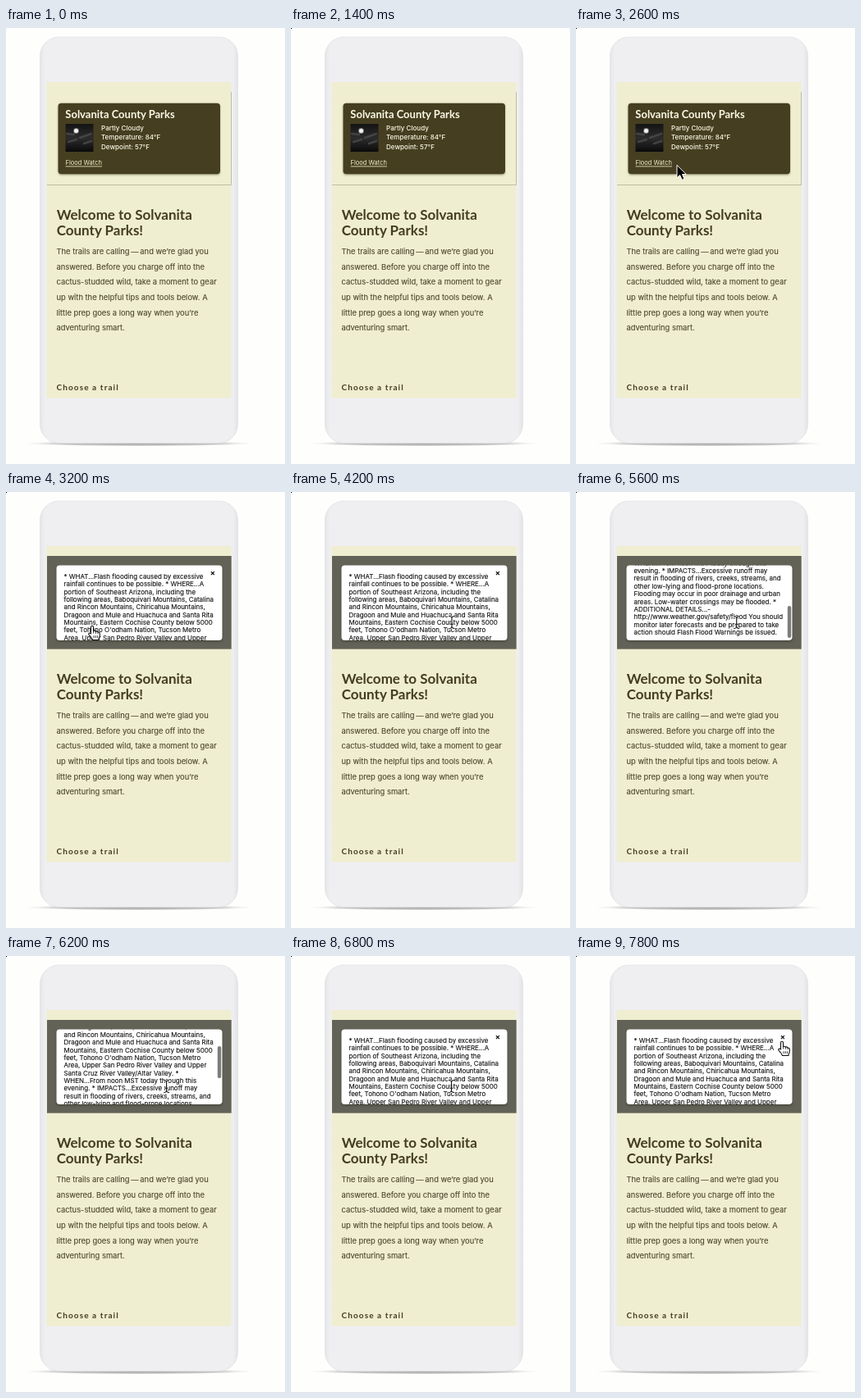
Write an HTML page that moves like this. It is 340 px wide and 532 px high and loops after 8 s.

```html
<!DOCTYPE html>
<html lang="en">
<head>
<meta charset="utf-8">
<title>Park alert on a phone</title>
<style>
html, body { margin: 0; width: 100%; height: 100%; overflow: hidden; background: #fefefc; }
svg { display: block; width: 340px; height: 532px; }
text { font-family: Inter, "Open Sans", sans-serif; white-space: pre; }
.title { font-family: Lato, "Open Sans", sans-serif; font-weight: 700; fill: #443d20; }
.body { font-size: 9.37px; fill: #4b452c; stroke: #4b452c; stroke-width: .1px; }
.card { font-size: 8.05px; font-weight: 500; fill: #fbfae8; }
.alert { font-size: 7.96px; fill: #111; stroke: #111; stroke-width: .12px; }
</style>
</head>
<body>
<svg viewBox="0 0 340 532">
  <defs>
    <linearGradient id="shell">
      <stop offset="0" stop-color="#e5e6e9"/>
      <stop offset=".025" stop-color="#efeff1"/>
      <stop offset=".975" stop-color="#efeff1"/>
      <stop offset="1" stop-color="#e3e4e8"/>
    </linearGradient>
    <radialGradient id="ground">
      <stop offset="0" stop-color="#a4a4a2"/>
      <stop offset=".7" stop-color="#b4b4b2" stop-opacity=".75"/>
      <stop offset="1" stop-color="#ddd" stop-opacity="0"/>
    </radialGradient>
    <linearGradient id="night" x2="0" y2="1">
      <stop offset="0" stop-color="#141414"/>
      <stop offset=".5" stop-color="#2c2c2c"/>
      <stop offset="1" stop-color="#080808"/>
    </linearGradient>
    <filter id="soft"><feGaussianBlur stdDeviation="1"/></filter>
    <clipPath id="photo"><rect x="72.5" y="117" width="34" height="34"/></clipPath>
    <clipPath id="box"><rect x="61.5" y="89.5" width="202" height="91.5" rx="4"/></clipPath>
  </defs>

  <rect width="340" height="532" fill="#fefefc"/>
  <ellipse cx="162" cy="507" rx="140" ry="3.4" fill="url(#ground)"/>
  <rect x="41.5" y="11" width="241" height="495.5" rx="23" fill="url(#shell)" stroke="#e0e1e4" stroke-width=".8"/>
  <rect x="49.5" y="66" width="225" height="385.5" fill="#efeed1"/>
  <path d="M50 191.5H274.5V78" fill="none" stroke="#b2b198" stroke-width=".8"/>

  <g id="forecast">
    <rect x="63.5" y="92.5" width="197.5" height="87" rx="4" fill="#6b6545" opacity=".5" filter="url(#soft)"/>
    <rect x="63.5" y="91.7" width="197.5" height="86.6" rx="4" fill="#463e20"/>
    <text class="title" x="72.3" y="109.8" style="font-size:13px;fill:#fbfae8">Solvanita County Parks</text>
    <g clip-path="url(#photo)">
      <rect x="72" y="117" width="35" height="35" fill="url(#night)"/>
      <g stroke-linecap="round" stroke-width="2.4" stroke="#4c4c4c" opacity=".8">
        <path d="M74 129L83 130M90 134L104 129M76 139L86 136M95 141L104 138"/>
      </g>
      <circle cx="85.5" cy="125.5" r="3.4" fill="#777"/>
      <circle cx="85.5" cy="125.5" r="2.5" fill="#f2f2f2"/>
    </g>
    <text class="card" x="116" y="125.4">Partly Cloudy</text>
    <text class="card" x="116" y="136.4">Temperature: 84°F</text>
    <text class="card" x="116" y="148.4">Dewpoint: 57°F</text>
    <text class="card" x="72.6" y="167.4" style="font-size:7.5px;font-weight:400;fill:#f3f1cc">Flood Watch</text>
    <path d="M72.6 168.9H117" stroke="#f3f1cc" stroke-width=".8"/>
  </g>

  <g id="modal">
    <rect x="50" y="78" width="224.5" height="113.5" fill="#626257"/>
    <rect x="61" y="91" width="203" height="92" rx="4" fill="#33332c" opacity=".4" filter="url(#soft)"/>
    <rect x="61.5" y="89.5" width="202" height="91.5" rx="4" fill="#fff"/>
    <g clip-path="url(#box)">
      <g id="alert"><path d="M249.9 97.1l4 4m0-4l-4 4" stroke="#111" stroke-width="1.3"/></g>
    </g>
    <rect id="thumb" x="257.8" y="90.5" width="4.4" height="39" rx="2.2" fill="#7d7d7d"/>
  </g>

  <text class="title" x="61.7" y="234.2" font-size="17">Welcome to Solvanita</text>
  <text class="title" x="61.7" y="253.2" font-size="17">County Parks!</text>
  <g id="intro"></g>
  <text class="title" x="61.5" y="442.3" font-size="10" letter-spacing="1.1">Choose a trail</text>

  <g id="arrow">
    <path d="M0 0V15.5L3.6 12.2L6.2 18L9 16.8L6.5 11.2H11.3Z" fill="#000" stroke="#fff" stroke-width="1"/>
  </g>
  <g id="beam" fill="none">
    <path id="stem" d="M-3.5 -7.5Q0 -7.5 0 -5Q0 -7.5 3.5 -7.5M0 -5V5M-3.5 7.5Q0 7.5 0 5Q0 7.5 3.5 7.5M-2 2.2H2"/>
    <use href="#stem" stroke="#fff" stroke-width="2.4"/>
    <use href="#stem" stroke="#111" stroke-width="1.1"/>
  </g>
  <g id="hand">
    <path d="M-1.5 9V1Q-1.5 -.7 0 -.7Q1.5 -.7 1.5 1V5.6Q3.2 4.6 4.3 6.2Q6 5.4 7 7Q9.3 6.6 9.3 9V11.5Q9.2 13 8 14.8V16.5H.5Q-.5 13.7 -4 10.2Q-4.8 8.2 -3 8Q-2.2 8.2 -1.5 9Z" fill="#fff" stroke="#111" stroke-width="1.1" stroke-linejoin="round"/>
    <path d="M1.5 5.6V8.5M4.3 6.2V8.8M7 7V9.2M2 11.2V14M4.2 11.2V14M6.4 11.2V14" stroke="#111" stroke-width=".8"/>
  </g>
  <rect id="dot" width="1" height="1" fill="#000"/>
</svg>
<script>
const $ = id => document.getElementById(id);

function addLines(parent, cls, x, y, step, lines) {
  lines.forEach((line, i) => {
    const el = document.createElementNS("http://www.w3.org/2000/svg", "text");
    el.setAttribute("class", cls);
    el.setAttribute("x", x);
    el.setAttribute("y", y + i * step);
    el.textContent = line;
    parent.append(el);
  });
}

addLines($("intro"), "body", 61.5, 275.8, 18.7, [
  "The trails are calling\u2009—\u2009and we’re glad you",
  "answered. Before you charge off into the",
  "cactus-studded wild, take a moment to gear",
  "up with the helpful tips and tools below. A",
  "little prep goes a long way when you’re",
  "adventuring smart."
]);

addLines($("alert"), "alert", 70.5, 105.8, 9.38, [
  "* WHAT...Flash flooding caused by excessive",
  "rainfall continues to be possible. * WHERE...A",
  "portion of Southeast Arizona, including the",
  "following areas, Baboquivari Mountains, Catalina",
  "and Rincon Mountains, Chiricahua Mountains,",
  "Dragoon and Mule and Huachuca and Santa Rita",
  "Mountains, Eastern Cochise County below 5000",
  "feet, Tohono O'odham Nation, Tucson Metro",
  "Area, Upper San Pedro River Valley and Upper",
  "Santa Cruz River Valley/Altar Valley. *",
  "WHEN...From noon MST today through this",
  "evening. * IMPACTS...Excessive runoff may",
  "result in flooding of rivers, creeks, streams, and",
  "other low-lying and flood-prone locations.",
  "Flooding may occur in poor drainage and urban",
  "areas. Low-water crossings may be flooded. *",
  "ADDITIONAL DETAILS...-",
  "http://www.weather.gov/safety/flood You should",
  "monitor later forecasts and be prepared to take",
  "action should Flash Flood Warnings be issued."
]);

// Keys are [time, value...]; values are interpolated linearly.
const scrollKeys = [[4200, 0], [4800, 89], [5200, 110], [5600, 110], [6200, 44.5], [6600, 0]];
const pointerKeys = [[1800, 312, 300], [2200, 200, 205], [2600, 123, 167.3], [2800, 108, 164],
  [3200, 105, 164], [4000, 196, 159], [6800, 195.5, 159], [7600, 251, 105]];
const opened = 3200;

function at(keys, t) {
  const i = keys.findIndex(k => k[0] > t);
  if (i === 0) return keys[0].slice(1);
  if (i < 0) return keys.at(-1).slice(1);
  const a = keys[i - 1], b = keys[i], p = (t - a[0]) / (b[0] - a[0]);
  return a.slice(1).map((v, j) => v + (b[j + 1] - v) * p);
}

function pointerAt(t) {
  if (t < 1800) return "";
  if (t < 2800) return "arrow";
  if (t < opened + 200) return "hand";
  return t < 7400 ? "beam" : "hand";
}

const show = (id, on) => $(id).setAttribute("visibility", on ? "visible" : "hidden");

function draw(now) {
  const t = Math.floor(now % 8000 / 200) * 200; // five pictures a second
  const [scroll] = at(scrollKeys, t), [x, y] = at(pointerKeys, t);
  const pointer = pointerAt(t);
  show("dot", t >= 200);
  show("modal", t >= opened);
  show("thumb", scroll > 0);
  $("alert").setAttribute("transform", `translate(0 ${-scroll})`);
  $("thumb").setAttribute("y", 90.5 + scroll * .44);
  for (const id of ["arrow", "hand", "beam"]) {
    show(id, id === pointer);
    $(id).setAttribute("transform", `translate(${x} ${y})`);
  }
  requestAnimationFrame(draw);
}
requestAnimationFrame(draw);
</script>
</body>
</html>
```
